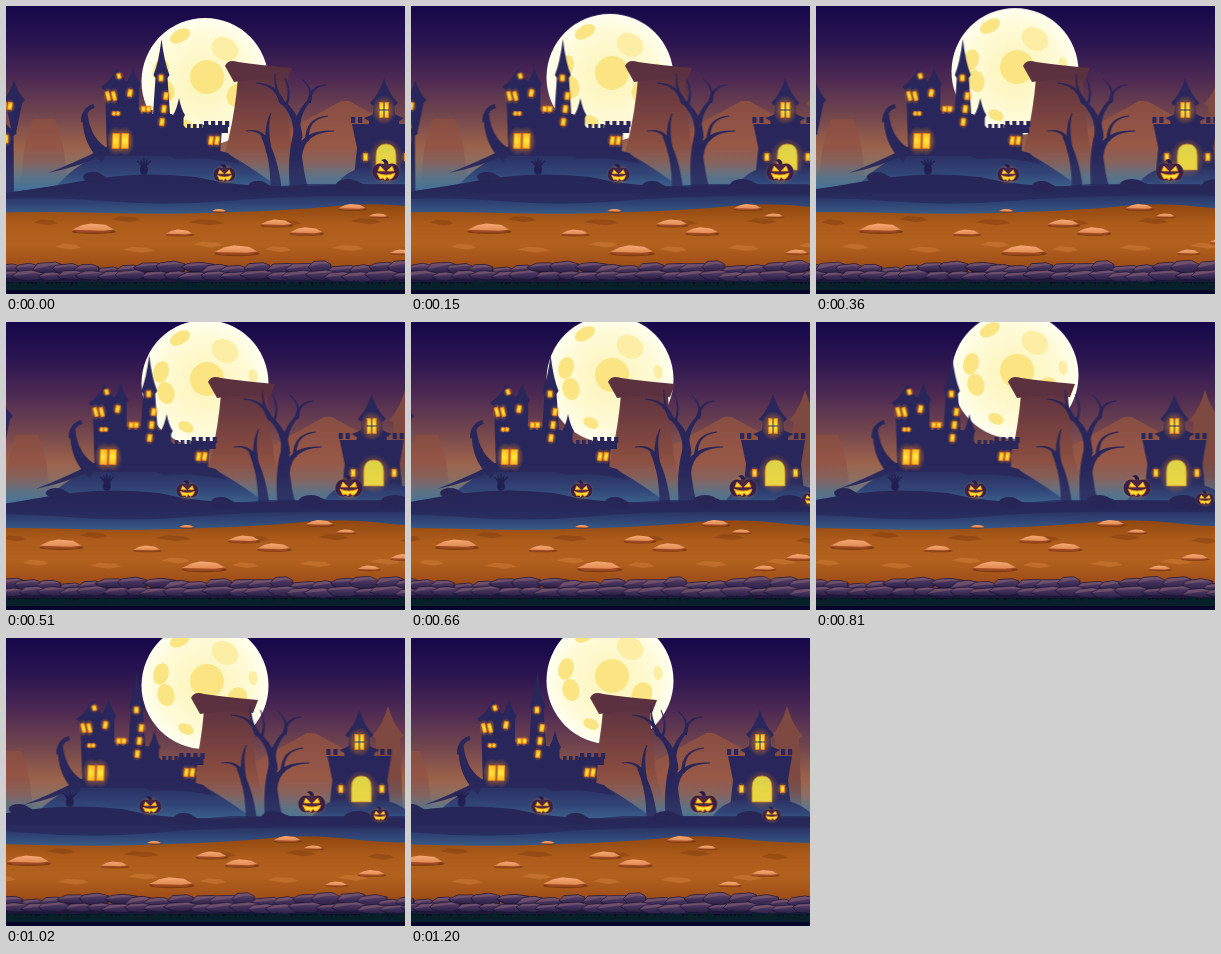
An HTML page for the animation above (1230 ms loop, 399x288 px).

```html
<!DOCTYPE html>
<html lang="en">
<head>
<meta charset="utf-8">
<title>Haunted valley</title>
<style>
html, body { margin: 0; width: 100%; height: 100%; overflow: hidden; background: #140848; }
svg { display: block; width: 100vw; height: 100vh; }
</style>
</head>
<body>
<svg viewBox="0 0 399 288" preserveAspectRatio="none">
  <defs id="defs"></defs>
  <rect width="399" height="288" fill="url(#sky)"/>
  <g id="moon"></g>
  <g id="far"></g>
  <rect y="140" width="399" height="60" fill="url(#mist)"/>
  <g id="castle"></g>
  <rect y="140" width="399" height="60" fill="url(#mist)" opacity=".22"/>
  <g id="ground"></g>
  <g id="soil"></g>
  <rect y="272" width="399" height="16" fill="#0a0a28"/>
  <g id="rocks"></g>
  <rect y="284" width="399" height="4" fill="#07062a"/>
</svg>
<script>
const LOOP = 1230, STEP = 30, NIGHT = '#28265a';
const el = id => document.getElementById(id);
const put = (id, ...parts) => { el(id).innerHTML = parts.flat().join(''); };
const times = (n, make) => Array.from({ length: n }, (_, i) => make(i));

let seed = 11;
const rnd = (lo, hi) => {
  seed = (seed * 16807) % 2147483647;
  return lo + (hi - lo) * seed / 2147483647;
};

// Basic shapes
const path = (d, fill = NIGHT, extra = '') => `<path d="${d}" fill="${fill}" ${extra}/>`;
const oval = (x, y, rx, ry, fill = NIGHT, turn = 0, extra = '') =>
  `<ellipse rx="${rx}" ry="${ry}" fill="${fill}" transform="translate(${x} ${y}) rotate(${turn})" ${extra}/>`;
const box = (x, y, w, h) => path(`M${x} ${y}h${w}v${h}h${-w}Z`);
const fade = (id, ...colors) =>
  `<linearGradient id="${id}" x2="0" y2="1">${colors.map((c, i) =>
    `<stop offset="${i / (colors.length - 1)}" stop-color="${c}"/>`).join('')}</linearGradient>`;

put('defs',
  fade('sky', '#15074a', '#2a1550', '#4c2953', '#71454e', '#a0654a', '#b87a52', '#a8785f', '#a8785f', '#a8785f'),
  fade('mist', '#54749c00', '#5a748c40', '#4c7896c0', '#40709a', '#2b4c84'),
  fade('pillar', '#5f3341', '#844a40', '#a9644a'),
  fade('mound', '#884e43', '#a7624a'),
  fade('hill', '#29285d', '#2d3d72', '#457ba0'),
  fade('lawn', '#272657', '#272759', '#2f4374', '#3a658f'),
  fade('earth', '#8f470f', '#ad5c1b', '#b2621e', '#a05018', '#71320f'),
  fade('stone', '#f7aa72', '#e08a53'),
  fade('lamp', '#ffbd24', '#ffe93e', '#ffb71f'),
  fade('door', '#d9d24a', '#ffe23a'),
  fade('rock', '#64496c', '#402f58', '#281e44'),
  `<radialGradient id="disc"><stop offset=".2" stop-color="#fdf6c0"/><stop offset=".75" stop-color="#fffbd8"/><stop offset="1" stop-color="#fffff2"/></radialGradient>
   <radialGradient id="glow"><stop offset=".2" stop-color="#f3861c" stop-opacity=".65"/><stop offset="1" stop-color="#f3861c" stop-opacity="0"/></radialGradient>`);

// Craters flatten towards the rim of the disc
const MX = 199, MY = 75.5, MR = 63.5;
const crater = (x, y, r, fill = '#fbe583') => {
  const dx = x - MX, dy = y - MY;
  const squash = Math.sqrt(1 - (dx * dx + dy * dy) / (MR * MR));
  return oval(x, y, r * squash, r, fill, Math.atan2(dy, dx) * 180 / Math.PI);
};
put('moon',
  oval(MX, MY, MR, MR, 'url(#disc)'),
  crater(201, 71, 17), crater(174, 30, 11), crater(219, 43, 14, '#fcefa5'), crater(155, 64, 11),
  crater(160, 85, 11), crater(180, 119, 8), crater(247, 68, 7, '#fcefa5'), crater(231, 89, 12));

const mound = (x, y, top, foot, h) =>
  path(`M${x - top} ${y}H${x + top}L${x + foot * .8} ${y + h * .4}L${x + foot} ${y + h}H${x - foot}L${x - foot * .8} ${y + h * .4}Z`, 'url(#mound)');

// Spired tower: concave roof over a tapering body
const tower = (x, eaves, half, roof, foot, base = half * .75, fill = NIGHT) =>
  path(`M${x - half} ${eaves}Q${x - half * .35} ${eaves - roof * .35} ${x} ${eaves - roof}Q${x + half * .35} ${eaves - roof * .35} ${x + half} ${eaves}
    L${x + half * .75} ${eaves + 3}L${x + base} ${foot}H${x - base}L${x - half * .75} ${eaves + 3}Z`, fill);
const merlons = (x, y, n, gap = 6) => times(n, i => box(x + i * gap, y, gap * .6, 6));

put('far',
  mound(38, 113, 11, 24, 67),
  mound(339, 95, 4, 82, 85),
  tower(416, 98, 16, 30, 180, 15, '#7d4941'),
  path('M232 72H279Q281 118 287 145L300 180H206Q226 140 232 72Z', 'url(#pillar)'),
  path('M219 60Q222 53 232 56Q252 59 286 62L281 75Q256 71 228 76Z', '#5b313f'));

// Lit window, centred on x, y
const lamp = (x, y, w, h, turn = 0) =>
  oval(x, y, w * 1.4, h, 'url(#glow)') +
  `<rect x="${-w / 2}" y="${-h / 2}" width="${w}" height="${h}" transform="translate(${x} ${y}) rotate(${turn})" fill="url(#lamp)" stroke="#e8851d" stroke-width=".8"/>`;
const pair = (x, y, w, h, gap, turn) => lamp(x - gap / 2, y, w, h, turn) + lamp(x + gap / 2, y, w, h, turn);

// Quadratic limb thinning from w to tip
const branch = (x0, y0, cx, cy, x1, y1, w, tip = .8, fill = NIGHT) => {
  const side = (x, y, dx, dy, r) => {
    const k = r / 2 / Math.hypot(dx, dy);
    return [[x - dy * k, y + dx * k], [x + dy * k, y - dx * k]];
  };
  const a = side(x0, y0, cx - x0, cy - y0, w);
  const b = side(cx, cy, x1 - x0, y1 - y0, (w + tip) / 2);
  const c = side(x1, y1, x1 - cx, y1 - cy, tip);
  return path(`M${a[0]}Q${b[0]} ${c[0]}L${c[1]}Q${b[1]} ${a[1]}Z`, fill);
};

put('castle',
  // edge tower
  tower(8, 94, 11, 20, 127, 2), tower(-3, 127, 14, 14, 190, 11),
  pair(1, 100, 4, 7, 6, 8), lamp(0, 133, 4, 8),
  // rear hill and castle
  path('M48 183Q74 152 112 142Q160 136 222 148Q244 160 276 184V195H48Z', 'url(#hill)'),
  path('M42 167Q70 156 94 144L112 136L196 140L222 147L234 158Q200 150 170 153Q130 134 98 148Q76 160 42 167Z'),
  branch(100, 150, 80, 136, 79, 108, 15, 5), branch(78, 116, 77, 103, 88, 100, 6, 4),
  tower(111, 81, 16, 19, 146, 10), tower(127, 78, 8, 17, 110),
  tower(155.5, 69, 8, 36, 145, 11), tower(173, 109, 6, 17, 140),
  path('M103 108H166L180 122H216L214 150H101Z'),
  merlons(131, 104, 3), merlons(181, 118, 4), merlons(198, 115, 4, 7), box(197, 119, 25, 8),
  lamp(113, 70, 3.5, 5, -15), pair(105, 90, 3.5, 9, 6, -15), lamp(124, 87, 4, 7, 10),
  pair(110, 107.5, 3, 3.5, 4, 12), pair(140, 103, 4, 5, 5, 5), lamp(155, 72, 4, 6),
  times(3, i => lamp(160 - i * 2, 90 + i * 13, 4, 7, 6)),
  pair(114.5, 135, 7, 15, 9, 3), pair(208, 134.5, 4, 8, 6, 8),
  // trees
  branch(270, 182, 268, 150, 257, 130, 11, 4), branch(262, 140, 258, 122, 240, 125, 5), branch(263, 146, 259, 120, 265, 107, 6),
  branch(293, 184, 287, 150, 292, 126, 18, 8), branch(292, 132, 292, 108, 274, 94, 9, 4),
  branch(277, 98, 270, 78, 250, 77, 5), branch(275, 96, 268, 80, 269, 67, 3.5), branch(280, 100, 286, 86, 279, 72, 3),
  branch(291, 127, 290, 108, 304, 94, 7, 3), branch(303, 97, 304, 80, 320, 79, 4), branch(304, 95, 307, 82, 296, 73, 3),
  branch(292, 150, 297, 124, 328, 125, 8), branch(301, 135, 300, 112, 322, 110, 4),
  // house
  tower(378, 97, 14, 25, 122, 12), tower(378, 112, 20, 12, 125),
  path('M346 118H410L406 142L410 180H347L351 142Z'),
  merlons(345, 111, 2, 7), merlons(399, 111, 2, 7),
  path('M326 190Q334 158 378 161Q424 158 440 190Z', 'url(#hill)'),
  oval(380, 152, 18, 20, 'url(#glow)'),
  path('M370 164V150Q370 138 380 138T390 150V164Z', 'url(#door)', 'stroke="#c98a2a" stroke-width=".8"'),
  lamp(378, 104, 9, 15), path('M378 96V112M373 104H383', 'none', `stroke="${NIGHT}"`),
  pair(380, 151, 4, 7, 41));

const pumpkin = (x, y, s) => `<g transform="translate(${x} ${y}) scale(${s})">
  ${oval(0, 0, 16, 13, 'url(#glow)')}
  ${path('M-1 -7Q-2 -11 -5 -12L-1 -13Q3 -11 2 -7Z', '#241d4c')}
  ${oval(-6, 0, 7.5, 8.5, '#3a2045')}${oval(6, 0, 7.5, 8.5, '#3a2045')}${oval(0, 0, 6, 9, '#4a2844')}
  ${path('M-8 -1L-6 -6L-1 -1ZM8 -1L6 -6L1 -1ZM-9 1Q0 5 9 1Q7 8 3 7L1 5L-1 8L-3 6L-6 7Z', '#ffdf31', 'stroke="#f08b17" stroke-width=".9"')}</g>`;
const bush = (x, y, w) => oval(x, y, w, w * .5, '#272657') + oval(x + w * .7, y + 2, w * .7, w * .4, '#272657');

put('ground',
  path('M-20 189Q20 185 70 176Q130 164 190 171Q240 183 300 180T400 179T520 178V212H-20Z', 'url(#lawn)'),
  path('M-20 194Q40 190 100 195T220 195T340 190T520 190V178H300Q220 186 190 172Q120 168 -20 190Z', '#272759', 'opacity=".7"'),
  bush(87, 171, 10), bush(252, 180, 10), bush(342, 179, 12), bush(426, 180, 14),
  oval(138, 164, 4, 5, '#222052'), times(5, i => branch(138, 165, 136 + i, 158, 131 + i * 3.5, 152 + Math.abs(i - 2) * 1.5, 3, 1, '#222052')),
  pumpkin(218.5, 168.5, .8), pumpkin(380, 166, 1), pumpkin(448, 177, .66));

const slab = (x, y, w) => {
  const a = w / 2, b = w * .11;
  const top = `M${x - a} ${y + b * .4}L${x - a * .55} ${y - b * .6}L${x - a * .1} ${y - b}L${x + a * .6} ${y - b * .7}L${x + a} ${y + b * .3}`;
  return oval(x + 1, y + b * .8, a * 1.05, b * .5, '#6d2d0d', 0, 'opacity=".7"') +
    path(`${top}L${x + a * .75} ${y + b}H${x - a * .7}Z`, '#9f4a22') +
    path(`${top}L${x + a * .5} ${y + b * .6}Z`, 'url(#stone)');
};
const stain = (color, lo, hi) => {
  const w = rnd(12, 19), y = rnd(lo, hi);
  return x => path(`M${x - w} ${y}L${x - w * .4} ${y - 3}L${x + w * .6} ${y - 2}L${x + w} ${y + 1}L${x + w * .2} ${y + 3}Z`, color, 'opacity=".35"');
};

put('soil',
  path('M-20 207Q40 205 100 207T230 206Q290 204 330 200T410 201T520 205V278H-20Z', 'url(#earth)'),
  times(6, i => stain('#74300a', 213, 221)(40 + i * 80)),
  times(6, i => stain('#df8b47', 238, 245)(62 + i * 70)),
  slab(87, 222, 42), slab(173, 226.5, 27), slab(213, 204.5, 14), slab(270, 217, 31), slab(300, 225, 33),
  slab(230, 244, 43), slab(346, 201, 27), slab(372, 209.5, 19), slab(395, 246, 22), slab(430, 235, 27));

// Rubble in heaps 120 px long
const boulder = (x, y, w, h) => {
  const p = times(7, i => {
    const a = Math.PI * (1 + i * 2 / 7) + rnd(-.25, .25);
    return [x + Math.cos(a) * w, y + Math.sin(a) * h].map(n => n.toFixed(1));
  });
  return path(`M${p.join('L')}Z`, 'url(#rock)', 'stroke="#1d163b"') +
    path(`M${p[0]}L${p[1]}L${p[2]}L${p[3]}L${x + w * .2} ${y - h * .5}Z`, '#8a6274', 'opacity=".5"');
};
const heap = x => 7 * Math.sqrt(Math.abs(Math.sin((x - 225) * Math.PI / 120)));
const row = (y, lift, w, h) => times(26, i => {
  const x = i * 21 - 20 + rnd(-4, 4);
  return boulder(x, y - lift * heap(x) + rnd(-1.5, 1.5), w * rnd(.75, 1.2), h * rnd(.8, 1.15));
});
const blades = times(135, i => `L${i * 4 - 20} ${rnd(273, 276).toFixed(1)}L${i * 4 - 18} ${rnd(276, 279).toFixed(1)}`).join('');

put('rocks',
  path('M-20 266H520V276H-20Z', '#211739'),
  row(268, .9, 15, 6), row(271, .2, 17, 5),
  path(`M-20 288V277${blades}V288Z`, '#08202a'));

// Layer speeds in px per ms
const drift = { moon: [0, -.0275], far: [-.0333, 0], castle: [-.0242, 0], ground: [-.0728, 0], soil: [-.0638, 0], rocks: [-.075, 0] };
for (const [id, [vx, vy]] of Object.entries(drift)) {
  el(id).animate(
    { transform: ['translate(0px, 0px)', `translate(${vx * LOOP}px, ${vy * LOOP}px)`] },
    { duration: LOOP, iterations: Infinity, easing: `steps(${LOOP / STEP}, end)` }).startTime = 0;
}
</script>
</body>
</html>
```
